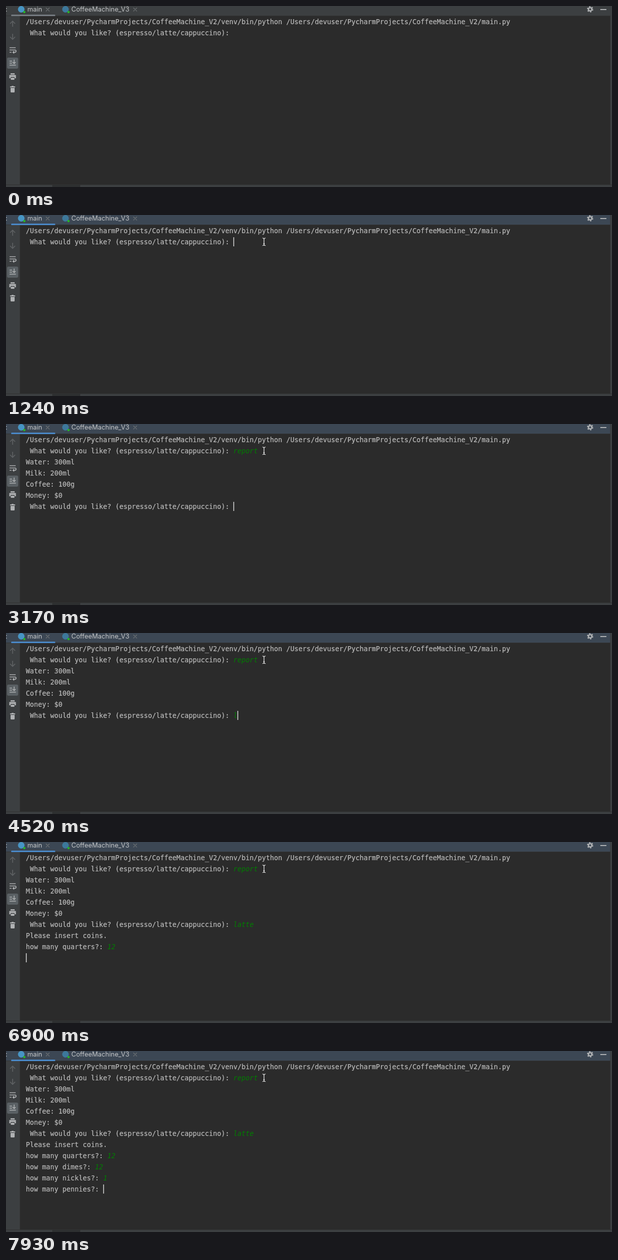
Write an HTML page that moves like this. It is 1192 by 358 pixels and loops after 8000 ms.

```html
<!DOCTYPE html>
<html lang="en">
<head>
<meta charset="utf-8">
<title>Coffee machine console</title>
<style>
  html, body { margin: 0; width: 100%; height: 100%; overflow: hidden; background: #2b2b2b; }
  svg { display: block; width: 100vw; height: 100vh; }
  text { white-space: pre; }
  .ui { font: 12.85px Inter, sans-serif; fill: #c3c5c7; }
  .console { font: 13.3px "DejaVu Sans Mono", monospace; }
  .output { fill: #bbbbbb; stroke: #bbbbbb; stroke-width: .2; }
  .input { font-style: italic; fill: #007f00; }
  .line { fill: none; stroke: #afb1b3; stroke-width: 1.7; }
  .dim { stroke: #5e6163; }
  .close { stroke: #6f7375; stroke-width: 1.1; }
  .solid { fill: #afb1b3; }
  #header { fill: #3c3f41; }
  #underline { fill: #747a80; }
  .active #header { fill: #3c4754; }
  .active #underline { fill: #4a88c7; }
</style>
</head>
<body>
<svg id="stage" viewBox="0 0 1192 358">
  <rect width="1192" height="358" fill="#3c3f41"/>
  <rect x="27" y="19" width="1162" height="335" fill="#323232"/>
  <rect x="28" y="20" width="1160" height="333" fill="#2b2b2b"/>
  <rect id="header" width="1188" height="19"/>
  <rect y="19" width="1188" height="1" fill="#323232"/>
  <rect y="353" width="1192" height="1" fill="#323232"/>
  <rect x="91" y="354" width="55" height="4" fill="#2d2f30"/>
  <rect id="underline" x="10" y="17" width="87" height="3" rx="1.5"/>

  <!-- tabs -->
  <g class="ui">
    <text x="-1" y="11">:</text>
    <text x="42" y="11">main</text>
    <text x="128.5" y="11">CoffeeMachine_V3</text>
  </g>
  <circle cx="30" cy="6.5" r="6.5" fill="#4795c4"/>
  <circle cx="117" cy="6.5" r="6.5" fill="#3d789b"/>
  <g fill="#28b428">
    <circle cx="36" cy="12" r="2.3"/>
    <circle cx="123" cy="12" r="2.3"/>
  </g>
  <path class="line close" d="M78.5 3.5l7 7m0-7l-7 7M250.5 3.5l7 7m0-7l-7 7"/>
  <g transform="translate(1149 6.5)">
    <circle class="line" r="3.3" style="stroke-width:2.6"/>
    <circle class="line" r="5.2" stroke-dasharray="2.7 2.745" style="stroke-width:2"/>
  </g>
  <path class="line" d="M1169 7h12" style="stroke-width:2"/>

  <!-- side toolbar -->
  <path class="line dim" d="M13 41V30M8 35l5-5 5 5M13 55v11M8 61l5 5 5-5"/>
  <path class="line" d="M7 82.500h12M7 87h10.500a2.300 2.300 0 0 1 0 4.600H14M7 91.500h4"/>
  <path class="solid" d="M16 88.500v6.200l-3.600-3.100z"/>
  <rect x="2" y="102" width="22" height="22" rx="3" fill="#5a6064"/>
  <path class="line" d="M7 109h5M7 113h5M7 117h12.500M16 106v7.500M13 111l3 3 3-3" style="stroke-width:1.5"/>
  <path class="solid" d="M9 133h8v2.500h-8zM6.500 136.500h13v6.500h-2.500v-2.500h-8v2.500h-2.500zM9.500 142h7v4h-7z"/>
  <path class="solid" d="M8 159h3v-1h4v1h3v2h-10zM9 162h8v7.500q0 1.500-1.500 1.500h-5q-1.500 0-1.500-1.500z"/>

  <g id="rows" class="console"></g>
  <rect id="caret" width="1.8" height="18" fill="#bbbbbb"/>
  <path id="pointer" fill="none" stroke="#f2f2f2" stroke-width="1.2"
        d="M-3 -7.500q2.500 0 3 2q.5-2 3-2M0 -5.500V5.500M-3 7.500q2.500 0 3-2q.5 2 3 2M-1.500 3.500h3"/>
</svg>
<script>
const LOOP = 8000, LEFT = 39, CHAR = 8.007, ROW = 22;
const ORDER = " What would you like? (espresso/latte/cappuccino): ";
const PROJECT = "/Users/devuser/PycharmProjects/CoffeeMachine_V2/";
const $ = id => document.getElementById(id);

// Each event changes the console: print rows, type one key, or toggle the caret.
const print = (time, ...lines) => [{ time, run: s => {
  s.rows.push(...lines.map(out => ({ out, input: "" })));
} }];
const fill = (time, out) => [{ time, run: s => { s.rows.at(-1).out = out; } }];
const caret = (time, on) => [{ time, run: s => { s.caret = on; } }];
const type = (time, word, gap) => [...word].map((key, i) => ({
  time: time + i * gap,
  run: s => { s.rows.at(-1).input += key; s.caret = true; }
}));

const events = [
  print(0, `${PROJECT}venv/bin/python ${PROJECT}main.py`, ORDER),
  caret(1240, true),
  type(1840, "report", 148),
  print(3170, "Water: 300ml", "Milk: 200ml", "Coffee: 100g", "Money: $0", ORDER),
  caret(3620, false),
  caret(4220, true),
  type(4520, "latte", 145),
  print(5400, ""),
  fill(5550, "Please insert coins."),
  print(5550, "how many quarters?: "),
  caret(6150, false),
  type(6600, "12", 150),
  print(6900, ""),
  fill(7050, "how many dimes?: "),
  type(7200, "12", 140),
  print(7490, ""),
  fill(7640, "how many nickles?: "),
  type(7780, "1", 0),
  print(7930, "how many pennies?: ")
].flat();

const pointerStops = [[500, 610.5, 50.5], [800, 520, 54.5], [950, 507.5, 53]];

function addText(text, column, row, className) {
  const node = document.createElementNS("http://www.w3.org/2000/svg", "text");
  const indent = text.length - text.trimStart().length;
  node.setAttribute("x", LEFT + (column + indent) * CHAR);
  node.setAttribute("y", 36 + row * ROW);
  node.setAttribute("class", className);
  node.textContent = text.trim();
  $("rows").append(node);
}

function drawConsole(done) {
  const state = { rows: [], caret: false };
  done.forEach(event => event.run(state));
  $("rows").replaceChildren();
  state.rows.forEach(({ out, input }, i) => {
    if (out) addText(out, 0, i, "output");
    if (input) addText(input, out.length, i, "input");
  });
  const last = state.rows.at(-1);
  $("caret").setAttribute("x", Math.round(LEFT + (last.out + last.input).length * CHAR));
  $("caret").setAttribute("y", 22 + (state.rows.length - 1) * ROW);
  $("caret").style.visibility = state.caret ? "visible" : "hidden";
}

let drawn = -1;
function render(t) {
  const done = events.filter(event => event.time <= t);
  if (done.length !== drawn) drawConsole(done);
  drawn = done.length;

  $("stage").classList.toggle("active", t >= 1240);
  const stop = pointerStops.findLast(([time]) => time <= t);
  $("pointer").style.visibility = stop ? "visible" : "hidden";
  if (stop) $("pointer").setAttribute("transform", `translate(${stop[1]} ${stop[2]})`);
}

const start = performance.now();
function tick() {
  render((performance.now() - start) % LOOP);
  requestAnimationFrame(tick);
}
tick();
</script>
</body>
</html>
```
